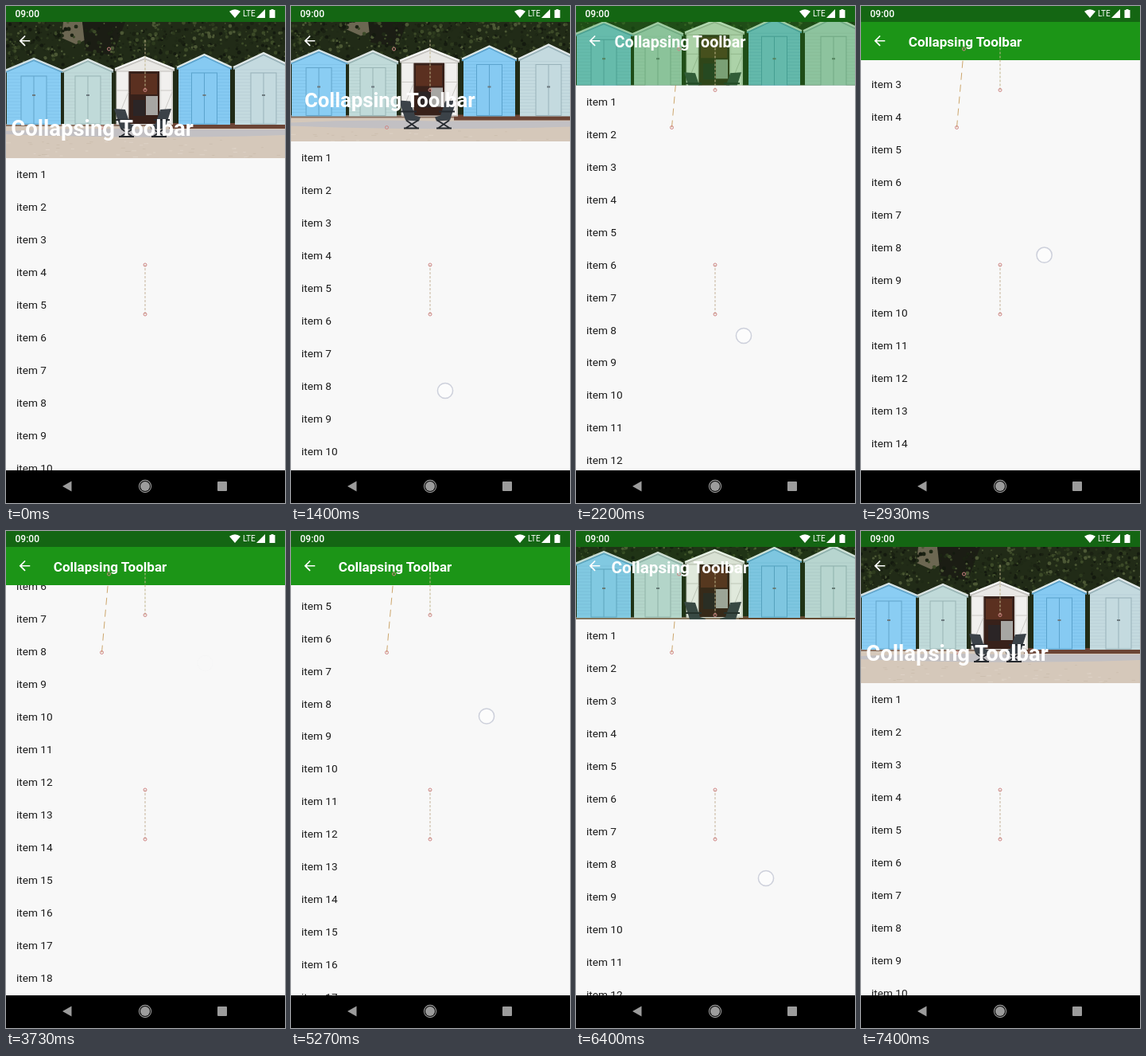
An HTML page for the animation above (7.87 s loop, 351 by 624 pixels).

```html
<!DOCTYPE html>
<html lang="en">
<head>
<meta charset="utf-8">
<title>Collapsing Toolbar</title>
<style>
html, body { margin: 0; width: 100%; height: 100%; overflow: hidden; background: #000; }
svg { display: block; width: 100%; height: 100%; font-family: Roboto, sans-serif; }
</style>
</head>
<body>
<svg id="stage" viewBox="0 0 351 624">
  <defs>
    <clipPath id="headClip"><rect id="headRect" y="20" width="351" height="171"/></clipPath>
    <clipPath id="listClip"><rect id="listRect" y="191" width="351" height="392"/></clipPath>
  </defs>
  <rect width="351" height="624" fill="#f8f8f8"/>
  <g clip-path="url(#listClip)"><g id="list" font-size="13.65" fill="#1c1c1c"></g></g>
  <g id="under" fill="none"></g>
  <g clip-path="url(#headClip)">
    <g id="photo"></g>
    <rect id="tint" y="20" width="351" height="171" fill="#1c9517"/>
  </g>
  <path transform="translate(13.2 33.5) scale(.853)" fill="#fff"
    d="M20 11H7.83l5.59-5.59L12 4l-8 8 8 8 1.41-1.41L7.83 13H20z"/>
  <g id="over" fill="none"></g>
  <text id="title" text-anchor="middle" font-size="17.07" font-weight="700" fill="#fff">Collapsing Toolbar</text>
  <rect width="351" height="20" fill="#146613"/>
  <g fill="#fff">
    <text x="11.5" y="14.2" font-size="12" font-weight="500">09:00</text>
    <path d="M281 6.8Q288 1.6 295 6.8L288 15Z"/>
    <text x="298" y="13.2" font-size="10">LTE</text>
    <path d="M326 4V15H315Z"/>
    <path d="M333.5 5V4h3v1H338.5V15H331.5V5Z"/>
  </g>
  <rect y="583" width="351" height="41" fill="#000"/>
  <g fill="#9c9c9c">
    <path d="M71 603L82.5 596.5V609.5Z"/>
    <circle cx="175" cy="603" r="6"/>
    <circle cx="175" cy="603" r="7.6" fill="none" stroke="#9c9c9c" stroke-width="1.1"/>
    <rect x="266" y="597" width="12" height="12" rx="1"/>
  </g>
  <circle id="touch" r="9.6" fill="#fff" fill-opacity=".6" stroke="#cdd0db" stroke-width="1.5"/>
</svg>
<script>
const LOOP = 7870, STEP = 1000 / 15, ROW = 40.96, OPEN = 191, SHUT = 68;
const $ = id => document.getElementById(id);
const clamp = v => Math.max(0, Math.min(1, v));

function add(parent, tag, attrs, text) {
  const el = document.createElementNS("http://www.w3.org/2000/svg", tag);
  for (const k in attrs) el.setAttribute(k, attrs[k]);
  if (text) el.textContent = text;
  parent.appendChild(el);
  return el;
}
const rect = (p, x, y, width, height, fill, more) => add(p, "rect", { x, y, width, height, fill, ...more });
const path = (p, d, fill, more) => add(p, "path", { d, fill, ...more });

function seeded(s) {
  return () => (s = (s * 16807) % 2147483647) / 2147483647;
}

function drawTrees(g) {
  const rnd = seeded(77);
  const greens = ["#141a0f", "#1f2916", "#2d3a1e", "#3c4a28", "#4c5835", "#1a2112"];
  rect(g, 0, 20, 351, 135, "#212b17");
  path(g, "M72 20H96L101 42L88 48L70 40Z", "#6c6752");
  path(g, "M96 20H150L134 62L100 56Z", "#1b1d14");
  for (let i = 0; i < 800; i++) {
    const x = rnd() * 351, y = 20 + rnd() * 62;
    if (x > 72 && x < 132 && rnd() < .6) continue;
    add(g, "circle", { cx: x, cy: y, r: .8 + rnd() * 1.8, fill: greens[rnd() * 6 | 0] });
  }
}

// One beach hut: walls, siding, gable roof and double door
function drawHut(g, x, w, peak, eave, wall, line, roof) {
  const r = x + w, c = x + w / 2;
  path(g, `M${x + 2} 149V${eave}L${c} ${peak}L${r - 2} ${eave}V149Z`, wall);
  for (let y = eave + 3; y < 147; y += 4)
    path(g, `M${x + 2} ${y}H${r - 2}`, "none", { stroke: line, "stroke-width": .6, opacity: .4 });
  path(g, `M${x} ${eave + 2}L${c} ${peak + 2}L${r} ${eave + 2}`, "none", { stroke: line, "stroke-width": 2 });
  path(g, `M${x} ${eave}L${c} ${peak}L${r} ${eave}`, "none", { stroke: roof, "stroke-width": 2.4 });
  rect(g, c - 16, eave + 7, 32, 141 - eave, wall, { stroke: line, "stroke-width": 1 });
  path(g, `M${c} ${eave + 7}V148`, "none", { stroke: line });
  rect(g, c - 2, 111, 4, 2, "#6d7b80");
}

function drawChair(g, x, flip) {
  const c = add(g, "g", { transform: `translate(${x} 129) scale(${flip} 1)` });
  path(c, "M0 0L14 1L20 19L27 21L25 26L8 25Z", "#3b4248");
  path(c, "M9 25L23 35M24 25L8 35M2 14H22M6 35H25", "none", { stroke: "#25292e", "stroke-width": 1.8 });
}

function drawPhoto(g) {
  drawTrees(g);
  rect(g, 0, 148, 351, 43, "#d5c8ba");
  path(g, "M0 157Q90 152 180 155H351V162Q180 168 0 161Z", "#c2c0c3");
  rect(g, 0, 148, 351, 3, "#8b7364");
  rect(g, 205, 147, 146, 7, "#6b4435");
  drawHut(g, -1, 72, 66, 81, "#8acdf3", "#62a5cb", "#d3e2e6");
  drawHut(g, 71, 64, 67, 81, "#c0dad9", "#99b5b5", "#dde5e4");
  drawHut(g, 215, 69, 61, 77, "#86caf2", "#5ba3cd", "#dce8e9");
  drawHut(g, 286, 76, 59, 77, "#c4dadf", "#98b2b9", "#e2e9ea");
  drawHut(g, 137, 75, 64, 79, "#e9e8e5", "#c4c2be", "#f9f9f8");
  rect(g, 154, 82, 39, 66, "#38211a");
  rect(g, 157, 85, 33, 26, "#5b3020");
  rect(g, 176, 113, 15, 24, "#a7a6a3");
  rect(g, 160, 118, 15, 20, "#2b2526");
  for (const x of [139, 194]) {
    rect(g, x, 82, 15, 66, "#f1f0ee", { stroke: "#c3c1bd" });
    path(g, `M${x} 106h15M${x} 145L${x + 15} 108`, "none", { stroke: "#cbc9c5" });
  }
  const rnd = seeded(9);
  for (let i = 0; i < 60; i++)
    rect(g, rnd() * 351, 167 + rnd() * 24, 2 + rnd() * 5, .8, i % 2 ? "#cbbdad" : "#dfd4c8");
  drawChair(g, 136, 1);
  drawChair(g, 208, -1);
}

function drawGuide(layer, x1, y1, x2, y2, color, dash, ends) {
  path($(layer), `M${x1} ${y1}L${x2} ${y2}`, "none", { stroke: color, "stroke-dasharray": dash });
  for (const [cx, cy] of ends) add($("over"), "circle", { cx, cy, r: 2, stroke: "#cf8584", "stroke-width": 1 });
}

drawPhoto($("photo"));
drawGuide("over", 175, 105.5, 175, 42, "#bfb48a", "3 2", [[175, 105.5]]);
drawGuide("over", 175, 387, 175, 325, "#c5b39b", "3 2", [[175, 387], [175, 325]]);
drawGuide("under", 120.5, 152.5, 130.5, 42, "#cda66c", "9 6", [[120.5, 152.5], [129.5, 54]]);
for (let i = 0; i < 22; i++)
  add($("list"), "text", { x: 13, y: 216.3 + i * ROW }, `item ${i + 1}`);

// time, finger x, finger y, scroll offset
const track = [
  [0, 190, 500, 0], [1130, 190, 500, 0], [1400, 194, 483, 21], [2200, 211, 414, 91.5],
  [2670, 222, 365, 142], [3470, 248, 186, 325], [3600, 250, 168, 345], [3730, 250.5, 166, 347],
  [4735, 266, 160, 347], [5270, 246, 233, 281], [6400, 239, 436, 80], [6840, 242, 520, 0],
  [7130, 246, 577, 0], [7270, 250, 602, 0], [7400, 251, 604, 0], [LOOP, 251, 604, 0]
];
// progress, title travel
const travel = [[0, 0], [.17, .33], [.48, .96], [.65, .99], [.75, 1], [1, 1]];

// Monotone cubic through the given rows
function curve(rows, t, col) {
  const slope = i => (rows[i + 1][col] - rows[i][col]) / (rows[i + 1][0] - rows[i][0]);
  const tangent = i => {
    if (i === 0) return slope(0);
    if (i === rows.length - 1) return slope(i - 1);
    const a = slope(i - 1), b = slope(i);
    return a * b > 0 ? 2 * a * b / (a + b) : 0;
  };
  let i = 0;
  while (i < rows.length - 2 && t >= rows[i + 1][0]) i++;
  const [a, b] = [rows[i], rows[i + 1]], h = b[0] - a[0], u = (t - a[0]) / h, v = 1 - u;
  return a[col] * (1 + 2 * u) * v * v + b[col] * u * u * (3 - 2 * u)
    + h * (tangent(i) * u * v * v - tangent(i + 1) * u * u * v);
}

function touchAlpha(t) {
  if (t >= 1130 && t < 3740) return clamp((3740 - t) / 220);
  if (t >= 4790) return clamp((7400 - t) / 200);
  return 0;
}

function render(ms) {
  const t = Math.floor((ms % LOOP + 3.5) / STEP) * STEP;
  const scroll = curve(track, t, 3);
  const p = clamp(scroll / (OPEN - SHUT));
  const head = OPEN - p * (OPEN - SHUT);
  const move = curve(travel, p, 1), scale = 1.61 - .61 * p;

  $("headRect").setAttribute("height", head - 20);
  $("listRect").setAttribute("y", head);
  $("listRect").setAttribute("height", 583 - head);
  $("list").setAttribute("transform", `translate(0 ${-scroll})`);
  $("photo").setAttribute("transform", `translate(0 ${-(OPEN - head) / 2})`);
  $("tint").setAttribute("opacity", clamp((p - .62) / .38));
  $("title").setAttribute("transform",
    `translate(${121 + 10 * move} ${153.5 - 108.8 * move + 6.1 * scale}) scale(${scale})`);
  $("touch").setAttribute("transform", `translate(${curve(track, t, 1)} ${curve(track, t, 2)})`);
  $("touch").setAttribute("opacity", touchAlpha(t));
}

const start = performance.now();
function tick() {
  render(performance.now() - start);
  requestAnimationFrame(tick);
}
tick();
</script>
</body>
</html>
```
